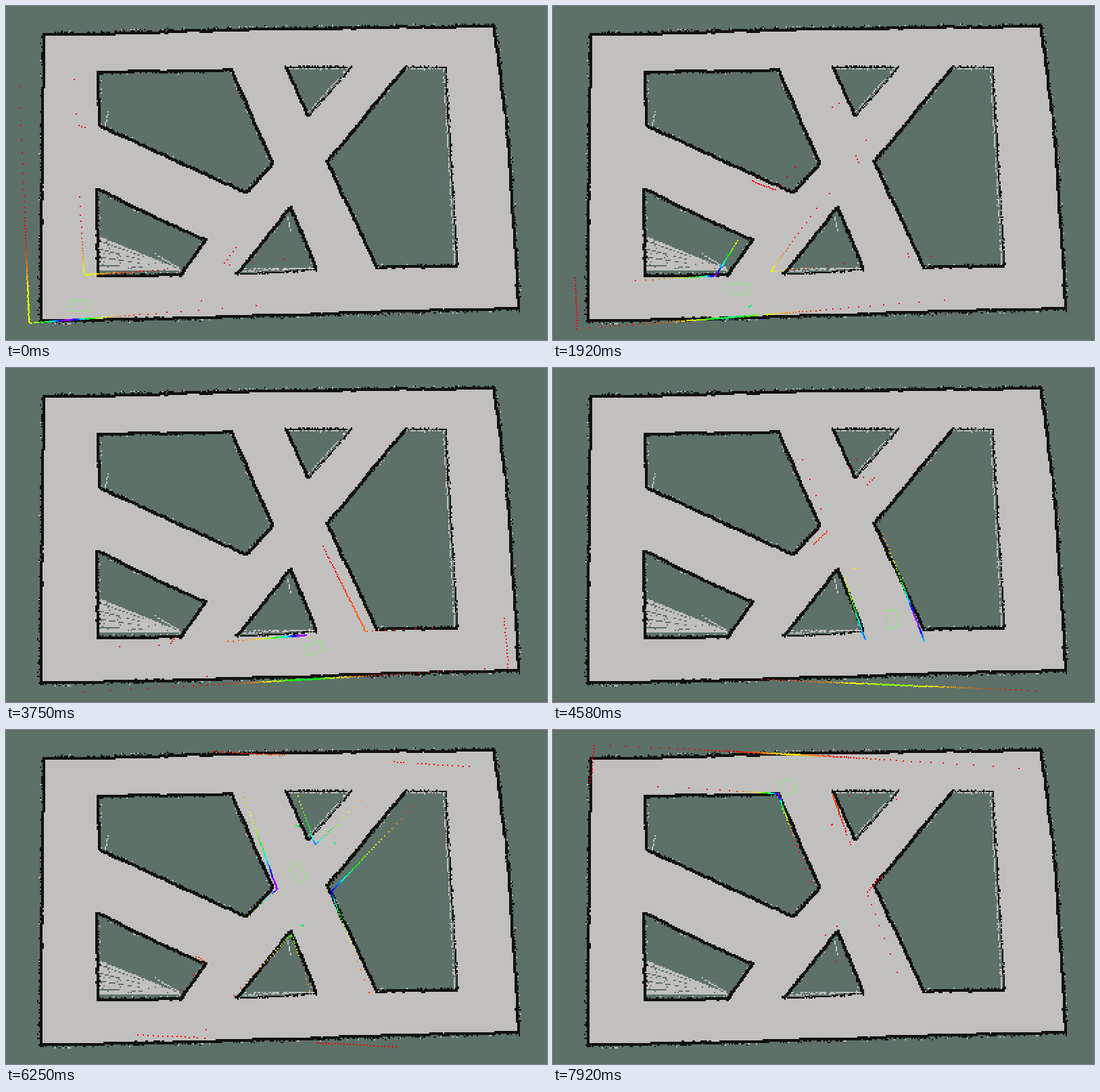
Recreate the animation shown at these times as an HTML page with a canvas. Size 800x495 px, loop 8 s.

```html
<!DOCTYPE html>
<html lang="en">
<head>
<meta charset="utf-8">
<title>Robot mapping a floor</title>
<style>
  html, body { margin: 0; width: 100%; height: 100%; overflow: hidden; background: #5d7169; }
  canvas { display: block; width: 800px; height: 495px; }
</style>
</head>
<body>
<canvas id="stage" width="800" height="495"></canvas>
<script>
const W = 800, H = 495, LOOP = 8000, FRAMES = 96;
const UNKNOWN = '#5d7169', FREE = '#c1c0be', WALL = '#10110f';
const ctx = document.getElementById('stage').getContext('2d');

const room = [[56, 43], [400, 34], [722, 30], [742, 200], [758, 448], [270, 462], [51, 467]];
// rough: how many leading edges were only partly observed
const blocks = [
  { points: [[136, 98], [333, 95], [395, 233], [355, 277], [137, 177]], rough: 0 },
  { points: [[414, 91], [512, 90], [446, 163]], rough: 2 },
  { points: [[590, 91], [650, 90], [667, 385], [548, 388], [475, 231]], rough: 2 },
  { points: [[259, 399], [136, 400], [135, 271], [210, 308], [296, 347]], rough: 0 },
  { points: [[460, 391], [341, 397], [421, 298]], rough: 1 }
];
const posts = [[309, 448], [418, 136], [476, 157], [436, 286], [502, 268]];

// time, x, y of the robot
const path = [[0, 107, 444], [1920, 276, 419], [2670, 365, 422], [3750, 455, 415],
  [4580, 501, 372], [6250, 432, 212], [LOOP, 341, 78]];

const rad = deg => deg * Math.PI / 180;
const clamp = (v, lo = 0, hi = 1) => Math.min(hi, Math.max(lo, v));
const smooth = (t, from, to) => {
  const u = clamp((t - from) / (to - from));
  return u * u * (3 - 2 * u);
};

function randomFrom(seed) {
  return () => {
    seed = (seed * 1664525 + 1013904223) >>> 0;
    return seed / 4294967296;
  };
}

const edgesOf = points => points.map((p, i) => [p, points[(i + 1) % points.length]]);
const diamond = ([x, y], r = 2.5) => [[x, y - r], [x + r, y], [x, y + r], [x - r, y]];
const segments = [room, ...blocks.map(b => b.points), ...posts.map(p => diamond(p))].flatMap(edgesOf);

function drawMap() {
  const canvas = document.createElement('canvas');
  canvas.width = W;
  canvas.height = H;
  const g = canvas.getContext('2d');
  const rand = randomFrom(41);

  const cell = (x, y, color, size = 2) => {
    g.fillStyle = color;
    g.fillRect(2 * Math.round((x - size / 2) / 2), 2 * Math.round((y - size / 2) / 2), size, size);
  };
  const fill = (points, color) => {
    g.fillStyle = color;
    g.beginPath();
    points.forEach(p => g.lineTo(...p));
    g.fill();
  };
  const along = ([a, b], visit) => {
    const dx = b[0] - a[0], dy = b[1] - a[1], len = Math.hypot(dx, dy);
    for (let d = 0; d <= len; d += 2) {
      visit(a[0] + dx * d / len, a[1] + dy * d / len, -dy / len, dx / len);
    }
  };
  const streak = (a, b, color = FREE, density = 0.85) =>
    along([a, b], (x, y) => { if (rand() < density) cell(x, y, color); });

  // side: -1 puts stray cells outside a clockwise outline, 1 inside
  const wall = (edge, side, rough) => {
    let wobble = 0;
    along(edge, (x, y, nx, ny) => {
      const put = (d, color, size) => cell(x + nx * d * side, y + ny * d * side, color, size);
      wobble = clamp(wobble + (rand() - 0.5) * 0.9, -0.8, 0.8);
      if (rough && rand() < 0.65) put(3, FREE);
      if (rand() < 0.07) put(4, FREE);
      if (!rough || rand() < 0.85) put(wobble, WALL, rough ? 2 : 4);
      if (rand() < 0.35) put(rough ? -1.5 : 2.5, WALL);
      if (side < 0 && rand() < 0.07) put(4.5, WALL);
    });
  };

  fill([[0, 0], [W, 0], [W, H], [0, H]], UNKNOWN);
  fill(room, FREE);
  blocks.forEach(b => fill(b.points, UNKNOWN));

  // beams that reached into the lower left block
  for (let y = 342; y < 394; y += 2) {
    streak([137, y], [257, 391], y % 12 < 2 ? UNKNOWN : FREE, y % 12 < 2 ? 0.45 : 0.95);
  }
  streak([220, 367], [256, 389]);
  streak([350, 390], [450, 388], FREE, 0.5);
  streak([151, 157], [147, 176]);
  streak([417, 312], [421, 336]);

  edgesOf(room).forEach(e => wall(e, -1, false));
  blocks.forEach(b => edgesOf(b.points).forEach((e, i) => wall(e, 1, i < b.rough)));
  streak([736, 160], [739, 196]);
  return canvas;
}

// smooth curve through the path points
function positionAt(t) {
  const i = clamp(path.findIndex(p => p[0] > t) - 1, 0, path.length - 2);
  const a = path[i], b = path[i + 1];
  const before = path[Math.max(0, i - 1)], after = path[Math.min(path.length - 1, i + 2)];
  const span = b[0] - a[0], u = (t - a[0]) / span;
  return [1, 2].map(n => {
    const m0 = (b[n] - before[n]) / (b[0] - before[0]) * span;
    const m1 = (after[n] - a[n]) / (after[0] - a[0]) * span;
    const d = b[n] - a[n];
    return a[n] + u * m0 + u * u * (3 * d - 2 * m0 - m1) + u * u * u * (m0 + m1 - 2 * d);
  });
}

function castRay(x, y, angle) {
  const dx = Math.cos(angle), dy = Math.sin(angle);
  let nearest = Infinity;
  for (const [a, b] of segments) {
    const ex = b[0] - a[0], ey = b[1] - a[1], ax = a[0] - x, ay = a[1] - y;
    const det = dx * ey - dy * ex;
    if (!det) continue;
    const r = (ax * ey - ay * ex) / det, s = (ax * dy - ay * dx) / det;
    if (r > 0 && r < nearest && s >= 0 && s <= 1) nearest = r;
  }
  return nearest;
}

// The scan trails behind the robot and is slightly turned against the map.
function drawScan(x, y, heading, lag, turn, rand) {
  const back = rad(180 + heading * 1.17);
  const cx = x + lag * Math.cos(back), cy = y + lag * Math.sin(back);
  const ranges = Array.from({ length: 360 }, (_, i) => castRay(x, y, rad(heading + i)));
  const closest = Math.min(...ranges);
  ranges.forEach((range, i) => {
    const r = range + (rand() - 0.5) * 1.6;
    if (r > 345) return;
    const angle = rad(heading + i + turn);
    ctx.fillStyle = `hsl(${280 * clamp((closest / r - 0.18) / 0.82)}, 100%, 50%)`;
    ctx.fillRect(Math.round(cx + r * Math.cos(angle) - 1), Math.round(cy + r * Math.sin(angle) - 1), 2, 2);
  });
}

function drawRobot(x, y, heading, roundness) {
  const c = Math.cos(rad(heading)), s = Math.sin(rad(heading));
  ctx.fillStyle = 'rgba(105, 250, 75, 0.75)';
  const dot = (px, py) => {
    const k = 12 / Math.hypot(px, py) * roundness + 1 - roundness;
    ctx.fillRect(Math.round(x + (px * c - py * s) * k), Math.round(y + (px * s + py * c) * k), 1, 1);
  };
  for (let d = -13; d <= 13; d++) { dot(d, -8); dot(d, 8); }
  for (let d = -8; d <= 8; d++) { dot(-13, d); dot(13, d); }
}

const map = drawMap();
let shown = -1;

function render(now) {
  const frame = Math.floor((now % LOOP + 3) * FRAMES / LOOP) % FRAMES;
  if (frame === shown) return;
  shown = frame;
  const t = frame * LOOP / FRAMES;
  const [x, y] = positionAt(t);
  const heading = -122 * smooth(t, 3300, 5300);
  const lag = 18 * (1 - (t / LOOP) ** 3);
  const turn = -3 + 7.3 * clamp(-heading / 90);
  ctx.drawImage(map, 0, 0);
  drawScan(x, y, heading, lag, turn, randomFrom(frame * 977 + 5));
  drawRobot(x, y, heading, smooth(t, 7000, 7800));
}

const start = performance.now();
function tick() {
  render(performance.now() - start);
  requestAnimationFrame(tick);
}
tick();
</script>
</body>
</html>
```
